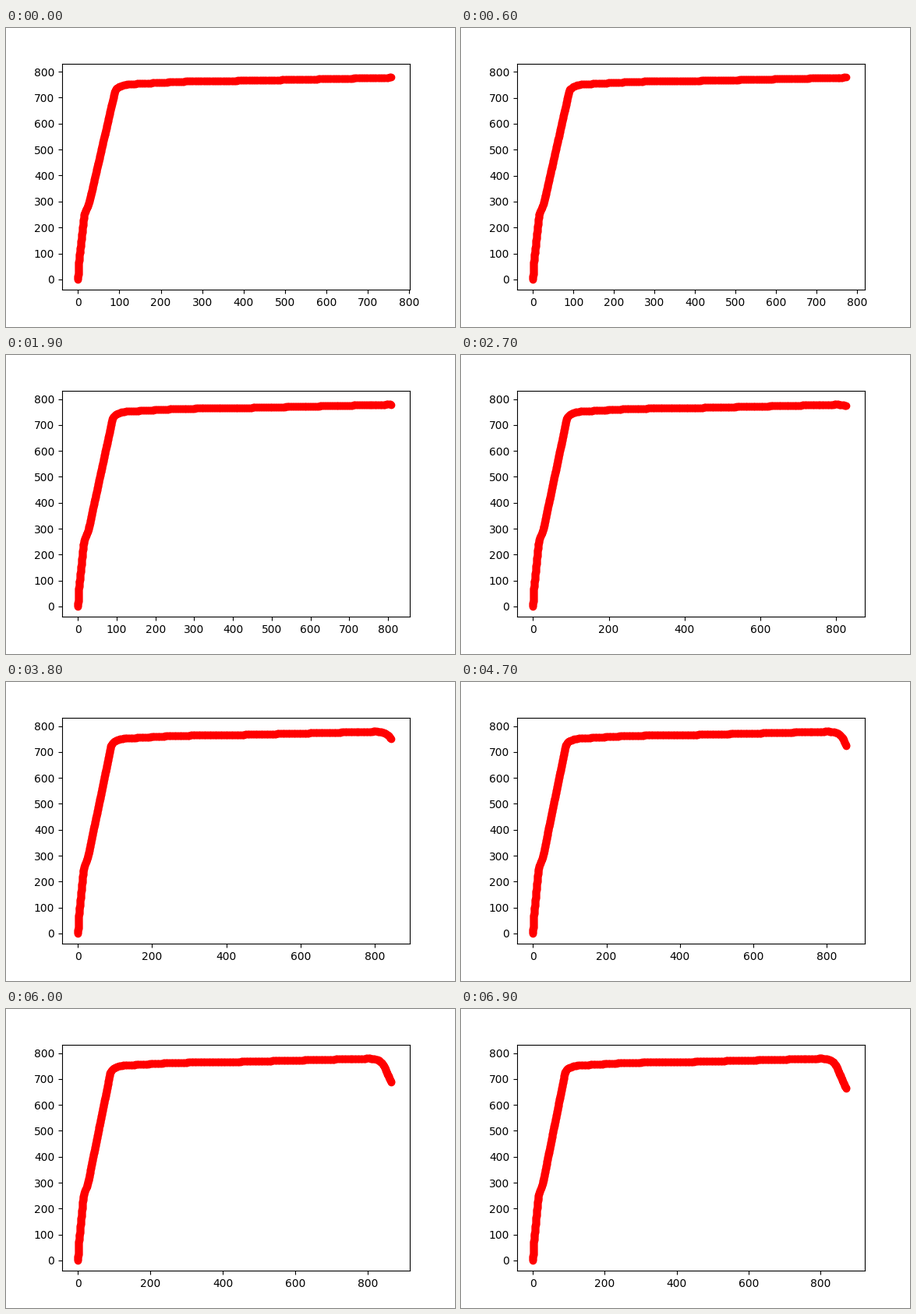
Recreate the animation shown at these times as a matplotlib script. Size 576 px wide and 384 px high, loop 7000 ms.

```python
import matplotlib.pyplot as plt
import numpy as np
from matplotlib.animation import FuncAnimation

FRAMES, INTERVAL = 70, 100
WIDTH, HEIGHT, DPI = 576, 384, 100
LEFT, RIGHT, BOTTOM, TOP = 0.125, 0.9, 0.1248, 0.88
RADIUS = 3 * DPI / 72    # dot radius in pixels
SPEED = 2.95             # distance covered per step on a straight
START_X = 756            # where the newest dot is when the loop begins

# corners of the route, rounded off below
CORNERS = np.array([
    (0, 0), (1.5, 60), (15.5, 258), (25.5, 287), (90.5, 736), (113, 751.5),
    (265, 763.4), (430, 766.4), (834.5, 780.5), (880, 635),
])


def rounded(points, radius=35):
    """Polyline whose corners are replaced by quadratic curves."""
    u = np.linspace(0, 1, 40)[:, None]
    parts = [points[:1]]
    for a, b, c in zip(points, points[1:], points[2:]):
        back, fore = a - b, c - b
        reach = min(radius, np.hypot(*back) / 2, np.hypot(*fore) / 2)
        p = b + back / np.hypot(*back) * reach
        q = b + fore / np.hypot(*fore) * reach
        parts.append((1 - u) ** 2 * p + 2 * u * (1 - u) * b + u ** 2 * q)
    return np.vstack(parts + [points[-1:]])


def fit(peak, size):
    """Limits with a 5 % margin that also leaves room for the peak's dot."""
    margin = size * 0.05 / 1.1
    unit = peak / (size - 2 * margin - RADIUS)
    return -margin * unit, (size - margin) * unit


route = rounded(CORNERS)
length = np.r_[0, np.cumsum(np.hypot(*np.diff(route, axis=0).T))]
start = np.interp(START_X, route[:, 0], length)

# constant speed, easing off through the last corner
step = np.arange(FRAMES)
speed = SPEED - 0.55 * np.exp(-((step - 21.5) / 11) ** 2)
ahead = start + np.cumsum(speed) - speed[0]
travelled = np.r_[np.arange(0, start, SPEED), ahead]
path = np.column_stack([np.interp(travelled, length, axis)
                        for axis in route.T])
past = len(path) - FRAMES

fig, ax = plt.subplots(figsize=(WIDTH / DPI, HEIGHT / DPI), dpi=DPI)
fig.subplots_adjust(left=LEFT, right=RIGHT, bottom=BOTTOM, top=TOP)
dots = ax.scatter([], [], color="red")


def draw(n):
    shown = path[:past + n + 1]
    xmax, ymax = shown.max(axis=0)
    dots.set_offsets(shown)
    ax.set_xlim(fit(xmax, WIDTH * (RIGHT - LEFT)))
    ax.set_ylim(fit(ymax, HEIGHT * (TOP - BOTTOM)))
    return dots,


anim = FuncAnimation(fig, draw, frames=FRAMES, interval=INTERVAL,
                     repeat=True, repeat_delay=0)
plt.show()
```
